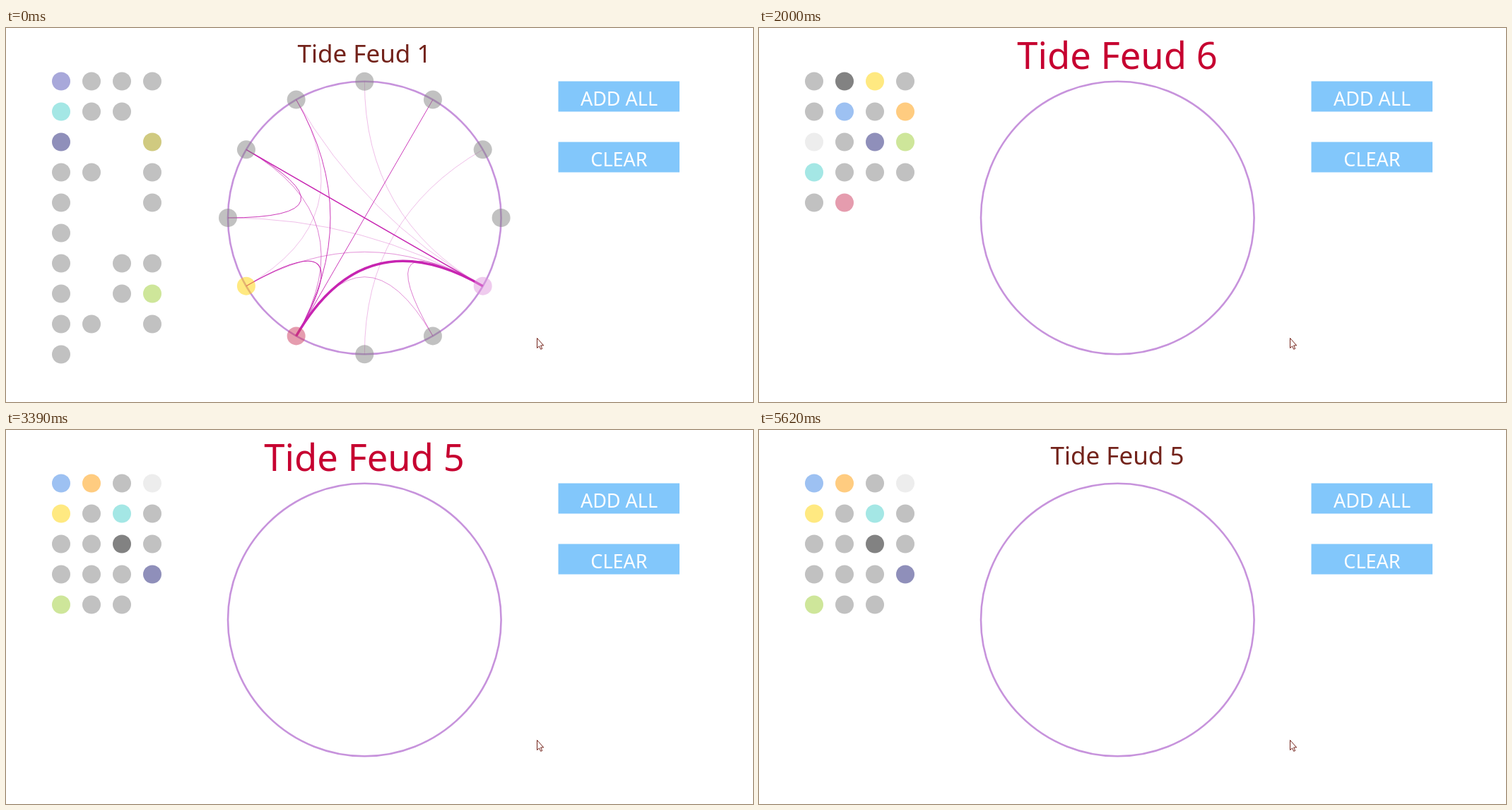
An HTML page with a canvas that plays this animation: 1057x530 px, repeating every 7150 ms.

```html
<!DOCTYPE html>
<html lang="en">
<head>
<meta charset="utf-8">
<title>Chord diagram</title>
<style>
  html, body { margin: 0; width: 100%; height: 100%; overflow: hidden; background: #fff; }
  canvas { display: block; }
</style>
</head>
<body>
<canvas id="stage" width="1057" height="530"></canvas>
<script>
const ctx = document.getElementById('stage').getContext('2d');
const LOOP = 7150, FONT = '"Noto Sans", "Open Sans", sans-serif';
const CX = 507.3, CY = 269, RADIUS = 193.3, DOT = 13;

const palette = {
  g: '#c1c1c1', k: '#828282', w: '#ededed', l: '#a8a8da', n: '#8f8fba', b: '#9dc1f2',
  c: '#a4e7e5', y: '#ffe981', o: '#ffcc80', v: '#d0ca80', e: '#cee69a', r: '#e59cae'
};

// Dot grid per episode, one word per row
const grids = {
  1: 'lggg cgg n..v gg.g g..g g g.gg g.ge gg.g g',
  4: 'ybkg gwgg cggo gggg gggg',
  5: 'bogw ygcg ggkg gggn egg',
  6: 'gkyg gbgo wgne cggg gr'
};

// [start ms, episode, title hovered]
const scenes = [
  [0, 1, false], [1000, 1, true], [1160, 6, false], [2000, 6, true], [2540, 5, false],
  [3390, 5, true], [3770, 4, false], [5150, 4, true], [5620, 5, false]
];

// [from, to, line width]; nodes are numbered clockwise from the top
const chords = [
  [11, 8, .3], [11, 4, .3], [0, 4, .3], [9, 4, .3], [2, 6, .3],
  [8, 4, .5], [7, 5, .5], [4, 5, .6], [10, 7, .6],
  [1, 7, .9], [9, 10, .9], [11, 7, .9], [8, 7, 1.1], [10, 4, 1.6], [7, 4, 3.5]
];
const nodeColors = { 4: '#df97dd', 7: '#cb395d', 8: '#ffd303' };

function disc(x, y, color) {
  ctx.fillStyle = color;
  ctx.beginPath();
  ctx.arc(x, y, DOT, 0, 2 * Math.PI);
  ctx.fill();
}

function text(str, x, y, size, color) {
  ctx.font = `${size}px ${FONT}`;
  ctx.textAlign = 'center';
  ctx.fillStyle = color;
  ctx.fillText(str, x, y);
}

function button(label, y) {
  ctx.fillStyle = '#82c7fb';
  ctx.fillRect(781.5, y, 171.5, 43);
  text(label, 867.5, y + 34.5, 27, '#fff');
}

function node(i) {
  const angle = (i - 3) * Math.PI / 6;
  return [CX + RADIUS * Math.cos(angle), CY + RADIUS * Math.sin(angle)];
}

function ring() {
  ctx.strokeStyle = '#c793dc';
  ctx.lineWidth = 2.6;
  ctx.beginPath();
  ctx.arc(CX, CY, RADIUS, 0, 2 * Math.PI);
  ctx.stroke();
}

function diagram() {
  ctx.strokeStyle = '#c724b1';
  for (const [from, to, width] of chords) {
    ctx.lineWidth = width;
    ctx.beginPath();
    ctx.moveTo(...node(from));
    ctx.quadraticCurveTo(CX, CY, ...node(to));
    ctx.stroke();
  }
  ctx.globalAlpha = .5;
  for (let i = 0; i < 12; i++) disc(...node(i), nodeColors[i] || '#838383');
  ctx.globalAlpha = 1;
}

function grid(rows) {
  rows.split(' ').forEach((row, r) => [...row].forEach((key, c) => {
    if (key !== '.') disc(78 + 43 * c, 75.5 + 43 * r, palette[key]);
  }));
}

const pointer = new Path2D('M751.5 439.5V453.5L754.5 450.8L756.7 455.3L758.7 454.4L756.6 449.9H760.7Z');
function cursor() {
  ctx.fillStyle = '#fff';
  ctx.fill(pointer);
  ctx.strokeStyle = '#73231b';
  ctx.lineWidth = 1;
  ctx.stroke(pointer);
}

function draw(now) {
  const time = now % LOOP;
  const [, episode, hovered] = scenes.findLast(([start]) => start <= time);
  ctx.fillStyle = '#fff';
  ctx.fillRect(0, 0, 1057, 530);
  const title = 'Tide Feud ' + episode;
  if (hovered) text(title, 507, 58, 52.5, '#c60030');
  else text(title, 507, 49, 35, '#73231b');
  grid(grids[episode]);
  ring();
  if (episode === 1) diagram();
  button('ADD ALL', 75.5);
  button('CLEAR', 161.5);
  cursor();
}

const began = performance.now();
function tick() {
  draw(performance.now() - began);
  requestAnimationFrame(tick);
}
tick();
</script>
</body>
</html>
```
